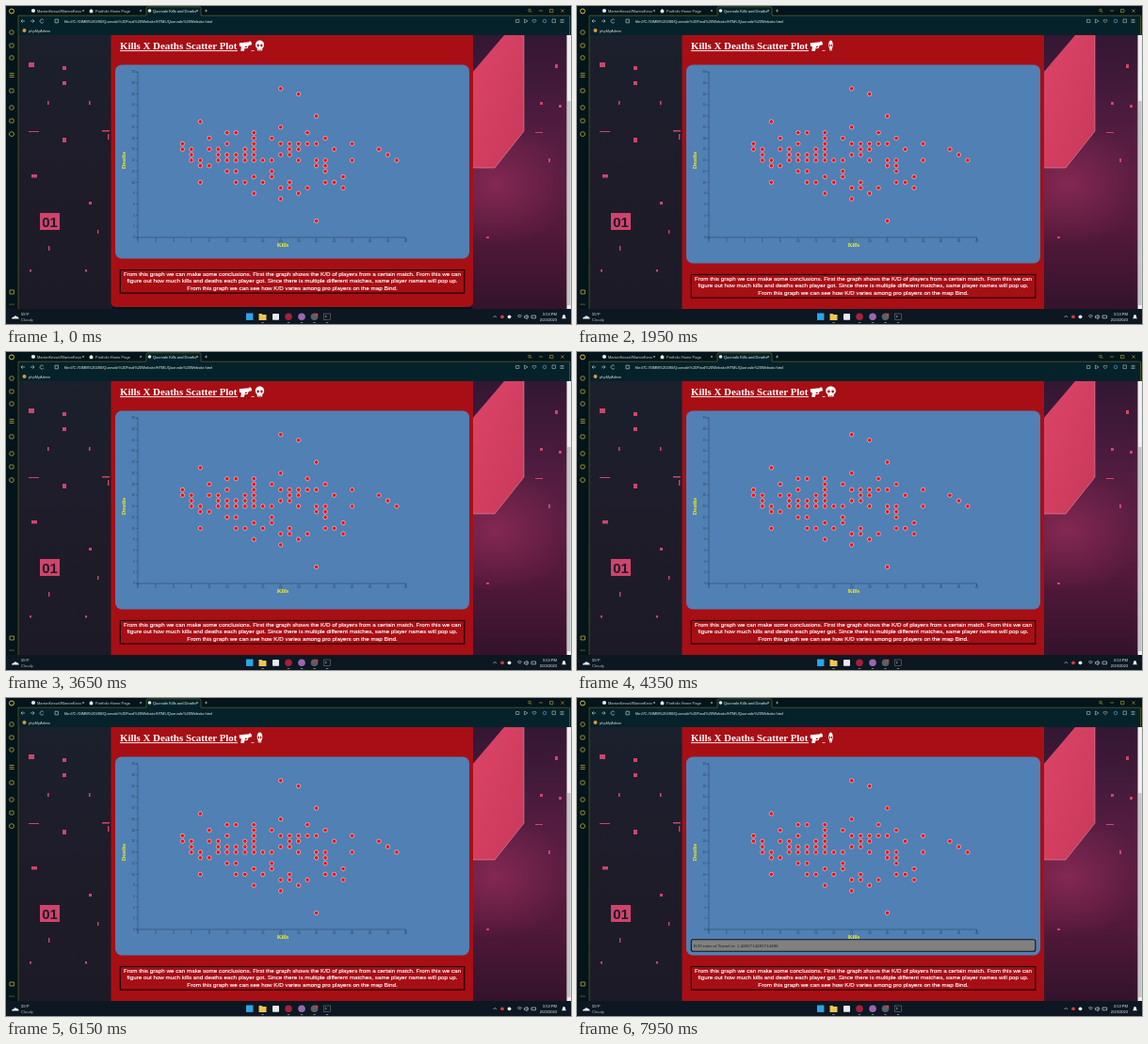
Write an HTML page that moves like this. It is 600 px wide and 338 px high and loops after 8000 ms.

```html
<!DOCTYPE html>
<html lang="en">
<head>
<meta charset="utf-8">
<title>Scatter plot page</title>
<style>
html, body { margin: 0; width: 100%; height: 100%; overflow: hidden; background: #03141a; }
svg { display: block; width: 100%; height: 100%; }
text { white-space: pre; }
.ui { font-family: "Liberation Sans", Arial, sans-serif; }
.serif { font-family: "Liberation Serif", "Times New Roman", serif; }
</style>
</head>
<body>
<svg id="stage" viewBox="0 0 600 338" preserveAspectRatio="none">
  <defs>
    <linearGradient id="leftWall" x1="0" y1="0" x2="0" y2="1">
      <stop offset="0" stop-color="#1a202c"/>
      <stop offset=".5" stop-color="#1f1c2a"/>
      <stop offset="1" stop-color="#1d1a27"/>
    </linearGradient>
    <linearGradient id="rightWall" x1="0" y1="0" x2="0" y2="1">
      <stop offset="0" stop-color="#321733"/>
      <stop offset=".4" stop-color="#561d41"/>
      <stop offset=".7" stop-color="#54193b"/>
      <stop offset="1" stop-color="#34132b"/>
    </linearGradient>
    <radialGradient id="glow">
      <stop offset="0" stop-color="#a3305f" stop-opacity=".6"/>
      <stop offset="1" stop-color="#a3305f" stop-opacity="0"/>
    </radialGradient>
    <linearGradient id="slab" x1="0" y1="0" x2="1" y2="1">
      <stop offset="0" stop-color="#dc4568"/>
      <stop offset="1" stop-color="#c83859"/>
    </linearGradient>
    <clipPath id="view"><rect x="13" y="31" width="583" height="291"/></clipPath>
  </defs>
  <g id="page" clip-path="url(#view)"></g>
  <g id="chrome"></g>
  <g id="taskbar"></g>
</svg>
<script>
const LOOP = 8000, FIRST_HOVER = 650;
const NS = "http://www.w3.org/2000/svg";
const $ = id => document.getElementById(id);

function add(parent, tag, attrs, content) {
  const el = document.createElementNS(NS, tag);
  for (const k in attrs) el.setAttribute(k, attrs[k]);
  if (content !== undefined) el.textContent = content;
  return parent.appendChild(el);
}
const rect = (p, x, y, width, height, fill, more) => add(p, "rect", { x, y, width, height, fill, ...more });
const disc = (p, cx, cy, r, fill, more) => add(p, "circle", { cx, cy, r, fill, ...more });
const path = (p, d, fill, more) => add(p, "path", { d, fill, ...more });
const line = (p, d, stroke, width = .7) => path(p, d, "none", { stroke, "stroke-width": width });
const text = (p, x, y, size, fill, str, more) =>
  add(p, "text", { x, y, "font-size": size, fill, class: "ui", ...more }, str);

const page = $("page"), chrome = $("chrome"), bar = $("taskbar");

function drawWalls() {
  const pink = "#d0446a";
  rect(page, 13, 31, 100, 291, "url(#leftWall)");
  path(page, "M24 60h6v5h-6ZM60 64h4v4h-4ZM60 80h4v4h-4ZM60 140h4v5h-4ZM27 179h6v3.5h-6Z", pink);
  path(page, "M24 133h11v1h-11ZM102 132h8v1.4h-8ZM44 101h1.6v4h-1.6ZM88 101h1.6v4h-1.6ZM108 136h1.4v6h-1.4Z", pink);
  path(page, "M88 208h3v3h-3ZM25 280h2v2.4h-2ZM84 280h2v2.4h-2ZM45 255h1.4v5h-1.4ZM97 238h1.4v4h-1.4Z", pink);
  rect(page, 36, 220, 21, 18, pink);
  text(page, 46.5, 234.6, 15, "#1f1a29", "01", { "text-anchor": "middle", "font-weight": "bold" });

  rect(page, 495, 31, 103, 291, "url(#rightWall)");
  add(page, "ellipse", { cx: 520, cy: 190, rx: 85, ry: 65, fill: "url(#glow)" });
  path(page, "M529 31H550V133L519 172H495V71Z", "url(#slab)");
  line(page, "M550 31V133L519 172H495", "#eda0b0", .5);
  path(page, "M583 62h3v4h-3ZM567 102h3v3h-3ZM587 105h3v3h-3ZM576 162h2v4h-2ZM562 134h8v1h-8ZM510 245h3v2h-3Z", pink);
}

// Deaths per player, one row for each kill count starting at 5.
const deaths = [
  [17, 16], [16, 15, 14], [21, 14, 13, 10], [18, 16, 13], [16, 15, 14],
  [19, 17, 15, 14, 12], [19, 15, 14, 12, 10], [16, 15, 14, 10],
  [19, 18, 17, 16, 15, 14, 11, 8], [14, 10], [18, 14, 12, 11],
  [27, 20, 17, 15, 9, 7], [17, 16, 15, 10, 9], [26, 17, 16, 14, 8],
  [19, 17, 9], [22, 17, 14, 13, 3], [18, 14, 13, 12, 10],
  [16, 10], [11, 9], [17, 14], [], [], [16], [15], [14]
];
const px = kills => 140 + kills * 9.48;
const py = count => 246 - count * 5.86;

function drawChart(p) {
  line(p, "M137.5 70H140V246H137.5M140 248.5V246H424.5V248.5", "#2c4768", .6);
  for (let v = 0; v <= 30; v += 2) {
    line(p, `M${px(v)} 246v2M140 ${py(v)}h-2`, "#2c4768", .5);
    text(p, px(v), 251.2, 3.1, "#26405f", v, { "text-anchor": "middle" });
    text(p, 137, py(v) + 1.1, 3.1, "#26405f", v, { "text-anchor": "end" });
  }
  const label = { class: "serif", "font-weight": "bold", "text-anchor": "middle" };
  text(p, 294, 255.5, 6.3, "#f5ee1c", "Kills", label);
  text(p, 0, 0, 6.3, "#f5ee1c", "Deaths", { ...label, transform: "translate(127 164) rotate(-90)" });
  deaths.forEach((row, i) => row.forEach(d =>
    disc(p, px(i + 5), py(d), 2.2, "#f5080c", { stroke: "#f3d3d6", "stroke-width": .65 })));
}

drawWalls();
const column = rect(page, 111.5, 20, 384.5, 310, "#a70f15", { rx: 5 });

text(page, 121, 46, 10.9, "#fff", "Kills X Deaths Scatter Plot", { class: "serif", "font-weight": "bold" });
rect(page, 121, 47.2, 125, .9, "#fff");
rect(page, 260.5, 47.2, 3, .7, "#fff");
const gun = add(page, "g", { transform: "rotate(-6 254.5 42)" });
path(gun, "M248.4 38.6H258.8V37.9H260V38.6Q261 38.8 261 39.6V41.3Q261 42 260.2 42H258.6L258 42.7H257.2L256.5 44.6Q256.2 45.2 255.4 45.2H253L252.4 47.6H249.2Q248.6 47.5 248.8 46.7L249.8 43Q249.8 42.6 248.6 42.5Q248 42.4 248 41.8V39.2Q248 38.6 248.4 38.6Z", "#fff");
path(gun, "M253.8 42.8H255.9L255.4 44.1H253.5Z", "#a70f15");

const skull = add(page, "g", {});
path(skull, "M-5.5-.8C-5.5-7.1 5.5-7.1 5.5-.8C5.5 1 4.5 2.3 3.3 3V4.6Q3.3 5.5 2.4 5.5H-2.4Q-3.3 5.5-3.3 4.6V3C-4.5 2.3-5.5 1-5.5-.8Z", "#fff");
disc(skull, -2.2, 0, 1.4, "#a70f15");
disc(skull, 2.2, 0, 1.4, "#a70f15");
line(skull, "M-1 4V5.5M1 4V5.5", "#a70f15", .6);

const panel = rect(page, 116, 62.5, 376, 211, "#5080b4", { rx: 7 });
drawChart(page);

const tip = add(page, "g", {});
rect(tip, 121.3, 256.8, 365.5, 12.4, "#808080", { rx: 2, stroke: "#10151a", "stroke-width": 1.1 });
const tipText = text(tip, 124, 264.7, 5, "#15181b", "", { class: "serif" });

const note = add(page, "g", {});
rect(note, 121.4, 285.5, 365.4, 24.6, "none", { stroke: "#1c0406", "stroke-width": 1.2 });
[
  "From this graph we can make some conclusions. First the graph shows the K/D of players from a certain match. From this we can",
  "figure out how much kills and deaths each player got. Since there is multiple different matches, same player names will pop up.",
  "From this graph we can see how K/D varies among pro players on the map Bind."
].forEach((s, i) => text(note, 304, 291.6 + i * 7.8, 6.25, "#fff", s,
  { "text-anchor": "middle", stroke: "#fff", "stroke-width": .15 }));

function drawChrome(p) {
  const gold = "#b9a936", edge = "#6f7128", ink = "#d3dcdc";
  rect(p, 0, 0, 600, 31, "#03141a");
  rect(p, 0, 0, 13, 322, "#03141a");
  rect(p, 13, 10, 587, 21, "#05222a");
  rect(p, 149, 1, 58, 10, "#05222a");
  line(p, "M13 322V10.2H149V2.5Q149 .8 151 .8H205Q207 .8 207 2.5V10.2H598.5V31", edge, .6);

  disc(p, 29, 5, 2.1, "#e8eded");
  text(p, 33, 6.5, 4, ink, "MartonKessel/MartonKess");
  path(p, "M88 5.2L90.5 3L93 5.2H92.2V7.2H88.8V5.2Z", "#e8eded");
  text(p, 95, 6.5, 4, ink, "Portfolio Home Page");
  disc(p, 152.5, 5, 1.8, "#e8eded");
  text(p, 156, 6.5, 4, "#f1f4f4", "Quorvale Kills and Deaths");
  line(p, "M81 4l2 2m0-2l-2 2M142 4l2 2m0-2l-2 2M202 4l2 2m0-2l-2 2M211 5h3M212.5 3.5v3", ink, .5);
  disc(p, 556, 4.6, 1.4, "none", { stroke: gold, "stroke-width": .6 });
  line(p, "M557 5.6l1.3 1.3M566 5h4M577.5 3.5h3.4v3.2h-3.4ZM589.4 3.5l3.2 3.2m0-3.2l-3.2 3.2", gold, .6);

  line(p, "M20 16h-4l1.7-1.7M16 16l1.7 1.7M26 16h4l-1.7-1.7M30 16l-1.7 1.7M39.8 15a2 2 0 1 0 .1 2M52 14.2h3.4v3.6h-3.4Z", ink, .6);
  text(p, 62, 17.5, 4, "#eef3f3", "file:///C:/GIMM%20280/Quorvale%20Final%20Website/HTML/Quorvale%20Website.html");
  line(p, "M541.5 14.5h3.4v3h-3.4ZM550.5 14l3.5 2l-3.5 2ZM561 17.8l-2-2q0-2 2-1q2-1 2 1ZM580 14h3.5v3.6H580ZM588.5 14.5h4M588.5 16h4M588.5 17.5h4", ink, .5);
  disc(p, 572, 16, 1.8, "none", { stroke: "#4f9ad0", "stroke-width": .7 });
  disc(p, 19.5, 26, 2, "#d79a3a");
  text(p, 24, 27.5, 4, ink, "phpMyAdmin");

  disc(p, 6, 5.5, 2.5, "none", { stroke: "#d4c43c", "stroke-width": 1 });
  [28, 42, 55, 90, 108, 122].forEach((y, i) => {
    if (i % 2) rect(p, 3.8, y - 2, 4.4, 4, "none", { rx: 1, stroke: gold, "stroke-width": .8 });
    else disc(p, 6, y, 2.3, "none", { stroke: gold, "stroke-width": .8 });
  });
  line(p, "M3.6 71.5h5M3.6 73.5h5M3.6 75.5h5M6 133.5l2.3 1.3v2.6l-2.3 1.3l-2.3-1.3v-2.6ZM4 302h4.4v4H4Z", gold, .8);
  [4, 6, 8].forEach(x => disc(p, x, 317, .6, gold));
  rect(p, 595.5, 31, 4.5, 291, "#eeeeee");
  rect(p, 596, 101, 3.6, 217, "#c4c4c4");
}

function drawTaskbar(p) {
  rect(p, 0, 322, 600, 16, "#0c1722");
  path(p, "M6 332.5q0-2.2 2.3-2q1-2 3.2-.6q2.2 0 2.2 2.6Z", "#e4eaee");
  text(p, 16, 329.3, 4.1, "#f0f4f6", "55°F");
  text(p, 16, 334.8, 4.1, "#aab7bf", "Cloudy");
  rect(p, 255, 326.5, 7.4, 7.4, "#2aa5ea");
  path(p, "M268.5 327h3l1 1h4v6h-8Z", "#f1c453");
  rect(p, 283, 327, 7, 6.8, "#e6ebee", { rx: .8 });
  disc(p, 300, 330.3, 3.8, "#a81f38");
  disc(p, 314, 330.3, 3.8, "#9a66b0");
  disc(p, 327.5, 330.3, 3.8, "#5c5f66");
  disc(p, 330, 328, 1.5, "#e03a3a");
  rect(p, 337.5, 327, 7, 6.5, "#10161a", { stroke: "#7c8a91", "stroke-width": .5 });
  line(p, "M339 328.8l1.4 1.2l-1.4 1.2", "#fff", .5);
  [272.5, 300, 314, 327.5, 341].forEach(x => rect(p, x - 1.4, 336, 2.8, .8, "#8fa2ab", { rx: .4 }));

  line(p, "M517.5 331l1.7-1.7l1.7 1.7M543 329.5q2.4-2.2 4.8 0M544 331q1.4-1.2 2.8 0M550.5 329.5h1.2l1.5-1.3v4.6l-1.5-1.3h-1.2ZM554.3 329q1 1.4 0 2.8M558 329h4.6v2.8H558Z", "#e7edf0", .6);
  disc(p, 527, 330.3, 1.9, "#d33b3b");
  disc(p, 534.5, 330.3, 1.9, "#e7edf0");
  const end = { "text-anchor": "end" };
  text(p, 585, 329.3, 4.1, "#f0f4f6", "3:53 PM", end);
  text(p, 585, 334.8, 4.1, "#f0f4f6", "2/23/2023", end);
  path(p, "M590 332.3q1-.8 1-2.5q0-1.7 1.5-1.7q1.5 0 1.5 1.7q0 1.7 1 2.5Z", "#e7edf0");
}

drawChrome(chrome);
drawTaskbar(bar);

const hovers = [
  { from: FIRST_HOVER, to: 1450, name: "Dovrik", ratio: "0.5882352941176471" },
  { from: 2300, to: 3300, name: "Pallu", ratio: "0.9090909090909091" },
  { from: 5000, to: 5800, name: "Ozo", ratio: "2.0714285714285716" },
  { from: 7500, to: LOOP, name: "Tornel", ratio: "1.4285714285714286" }
];

function render(t) {
  // The skull makes a half turn every 1.5 s, easing in and out.
  const u = ((t - 320) / 1500 + 1.5) % 1;
  const turn = Math.PI * (.5 - .5 * Math.cos(Math.PI * u));
  skull.setAttribute("transform", `translate(269.5 42) scale(${Math.max(.03, Math.abs(Math.cos(turn)))} 1)`);

  // The first hover leaves the panel slightly taller.
  const short = t < FIRST_HOVER ? 5 : 0;
  panel.setAttribute("height", 211 - short);
  column.setAttribute("height", short ? 300 : 310);
  note.setAttribute("transform", `translate(0 ${-short})`);

  const h = hovers.find(h => t >= h.from && t < h.to);
  tip.setAttribute("visibility", h ? "visible" : "hidden");
  if (h) tipText.textContent = `K/D ratio of ${h.name} is: ${h.ratio}`;
}

const start = performance.now();
function tick() {
  render((performance.now() - start) % LOOP);
  requestAnimationFrame(tick);
}
tick();
</script>
</body>
</html>
```
